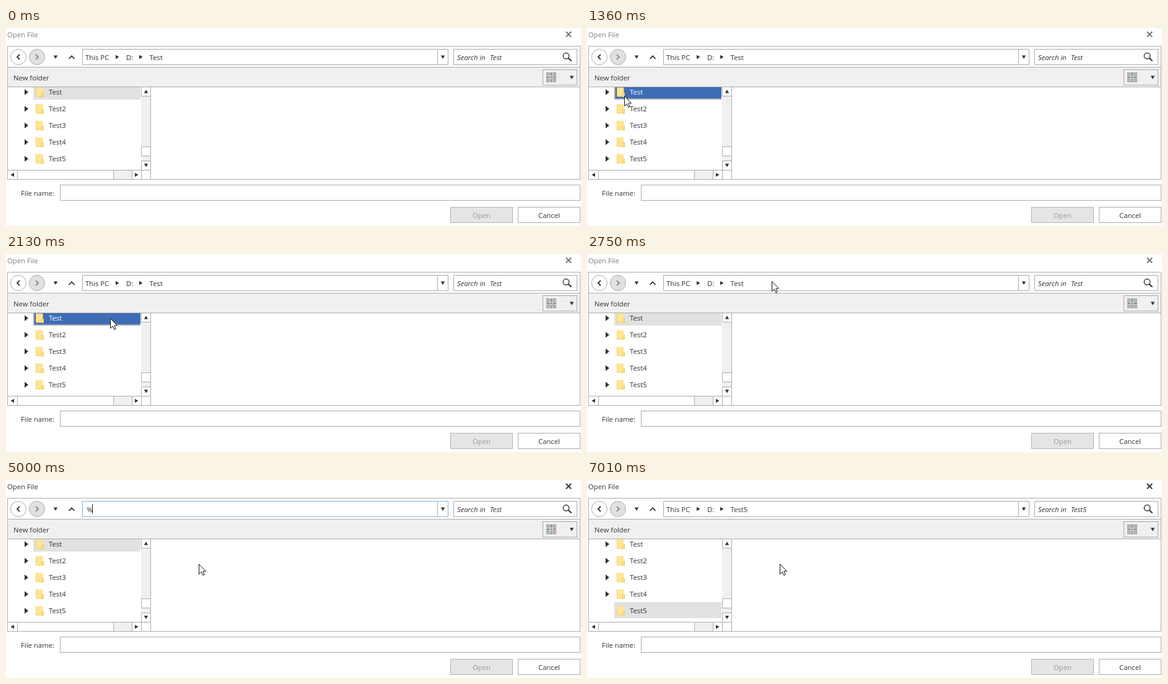
An HTML page that plays this animation: 928x321 px, repeating every 8 s.

```html
<!DOCTYPE html>
<html lang="en">
<head>
<meta charset="utf-8">
<title>Open File</title>
<style>
html, body { margin: 0; width: 100%; height: 100%; overflow: hidden; background: #fff; }
svg { display: block; width: 928px; height: 321px; }
text { font: 11.3px "Open Sans", "Noto Sans", sans-serif; fill: #333; white-space: pre; }
.box { fill: #fff; stroke: #ababab; }
.track { fill: #f0f0f0; }
.glyph { fill: #333; }
.line { fill: none; stroke: #333; stroke-width: 1.8; }
.italic { font-style: italic; }
.mid { text-anchor: middle; }
</style>
</head>
<body>
<svg viewBox="0 0 928 321">
  <defs>
    <path id="down" class="glyph" d="M-3.2-2.5H3.2L0 3Z"/>
    <path id="right" class="glyph" d="M-2.5-3.3L3 0L-2.5 3.3Z"/>
    <g id="folder">
      <path d="M48 0H59.5V14.5H48Z" fill="#ffe594"/>
      <path d="M48.5 0V14.5H58" fill="none" stroke="#f5cf5f"/>
      <path d="M58.5 8.5H60.5V15H57.5V11Z" fill="#ffe594" stroke="#efc64c"/>
    </g>
    <clipPath id="treeClip"><path d="M3 96H218V230H3Z"/></clipPath>
  </defs>

  <text id="title" x="2" y="15">Open File</text>
  <path id="close" class="line" d="M903.8 6L912.2 14.4M912.2 6L903.8 14.4" style="stroke-width:2"/>

  <rect class="box" x="2.5" y="29.5" width="924" height="216"/>
  <rect x="2.5" y="63.5" width="924" height="32" fill="#f0f0f0" stroke="#ababab"/>

  <circle class="box" cx="20" cy="47" r="12.5"/>
  <path class="line" d="M22 43L18 47L22 51"/>
  <circle cx="50" cy="47" r="12.5" fill="#e1e1e1" stroke="#ababab"/>
  <path class="line" d="M48 43L52 47L48 51" style="stroke:#888"/>
  <use href="#down" x="80" y="47"/>
  <path class="line" d="M101.5 50L106 45.3L110.5 50"/>

  <rect id="address" class="box" x="123.5" y="34.5" width="590" height="25"/>
  <path d="M696.5 35V59" stroke="#ababab"/>
  <use href="#down" x="705" y="47"/>
  <g id="crumbs">
    <text x="128" y="52">This PC</text>
    <use href="#right" x="179.5" y="47"/>
    <text x="194" y="52">D:</text>
    <use href="#right" x="217.5" y="47"/>
    <text id="crumb" x="231.5" y="52">Test</text>
  </g>
  <g id="edit">
    <rect id="selection" x="130" y="39" width="36" height="16" fill="#8cc2f2"/>
    <text id="typed" x="130.3" y="52"></text>
    <path id="caret" d="M.5 39V55" stroke="#222"/>
  </g>

  <rect class="box" x="722.5" y="34.5" width="199" height="25"/>
  <text class="italic" x="728" y="52">Search in</text>
  <text id="search" class="italic" x="781" y="52">Test</text>
  <circle class="line" cx="904" cy="45.3" r="4.8" style="stroke-width:1.4"/>
  <path class="line" d="M907.5 48.8L912.5 53.5" style="stroke-width:2.2"/>

  <text x="12" y="85">New folder</text>
  <rect x="866.5" y="67.5" width="55" height="25" fill="#f0f0f0" stroke="#ababab"/>
  <g id="grid"></g>
  <use href="#down" x="913" y="80"/>

  <g id="tree" clip-path="url(#treeClip)"></g>
  <path class="track" d="M218 96H233V230H218ZM3 231H218V245H3Z"/>
  <path class="box" d="M218.5 95.5H233.5V110.5H218.5ZM218.5 192.5H233.5V207.5H218.5ZM218.5 215.5H233.5V230.5H218.5ZM218.5 230.5H233.5V245.5H218.5Z"/>
  <path class="box" d="M2.5 230.5H18.5V245.5H2.5ZM18.5 230.5H173.5V245.5H18.5ZM203.5 230.5H218.5V245.5H203.5Z"/>
  <path d="M2.5 230.5H218M2.5 245.5H234M233.5 95V246" stroke="#ababab"/>
  <use href="#down" transform="translate(226 103) scale(1 -1)"/>
  <use href="#down" x="226" y="222.5"/>
  <use href="#right" transform="translate(10.5 238) scale(-1 1)"/>
  <use href="#right" x="210.5" y="238"/>

  <text x="24" y="272">File name:</text>
  <rect class="box" x="87.5" y="254.5" width="839" height="25"/>
  <rect x="717.5" y="290.5" width="100" height="25" fill="#e5e5e5" stroke="#b4b4b4"/>
  <text class="mid" x="767.5" y="308" style="fill:#999">Open</text>
  <rect class="box" x="826.5" y="290.5" width="100" height="25"/>
  <text class="mid" x="876.5" y="308">Cancel</text>

  <path id="arrow" d="M.5.5V16.5L4.3 13L6.8 18.5L9.2 17.5L6.9 12H11.5Z" fill="#fff" stroke="#111"/>
  <path id="beam" d="M297 37.5H299.5M301.5 37.5H304M300.5 38V52M297 52.5H299.5M301.5 52.5H304" fill="none" stroke="#111"/>
</svg>
<script>
const LOOP = 8000;
const EDIT_START = 3360, EDIT_END = 6860;

// time, x, y of the pointer tip
const POINTER = [
  [120, 756, 281], [200, 680, 236], [280, 560, 170], [350, 430, 102], [430, 340, 58], [510, 302, 42],
  [830, 296, 42], [910, 262, 46], [980, 205, 62], [1060, 140, 84], [1140, 80, 98], [1210, 58, 101],
  [1290, 60, 110], [1370, 75, 133], [1450, 100, 160], [1530, 125, 180], [1610, 145, 188],
  [1670, 159, 158], [1750, 163, 140], [1830, 165, 126], [1900, 166, 116], [1980, 167, 109],
  [2060, 168, 105], [2130, 168, 104], [2210, 188, 92], [2290, 225, 75], [2360, 258, 60], [2440, 279, 53],
  [2590, 285, 50], [2670, 293, 46], [2750, 298, 44], [3590, 309, 112], [3670, 311, 136]
];

// time, text, caret index (0 = all selected)
const TYPING = [
  [EDIT_START, "D:\\Test", 0], [5000, "%", 1], [5150, "%%", 2], [5700, "%%", 1],
  [5850, "%t%", 2], [5930, "%te%", 3], [6230, "%tes%", 4], [6310, "%test%", 5]
];

const $ = id => document.getElementById(id);
const show = (el, on) => { el.style.display = on ? "" : "none"; };
const setText = (el, s) => { if (el.textContent !== s) el.textContent = s; };
const stepAt = (table, t) => table.findLast(step => step[0] <= t);

function add(parent, tag, attrs, text = "") {
  const el = document.createElementNS("http://www.w3.org/2000/svg", tag);
  for (const key in attrs) el.setAttribute(key, attrs[key]);
  el.textContent = text;
  return parent.appendChild(el);
}

const dots = ["#c55", "#555", "#48a", "#555", "#2ab", "#555", "#48a", "#584", "#c55"];
dots.forEach((color, i) => {
  const x = 872.5 + i % 3 * 5.5, y = 72.5 + Math.floor(i / 3) * 5.5;
  add($("grid"), "rect", { x, y, width: 4, height: 4, fill: "#fff", stroke: "#888", "stroke-width": .8 });
  add($("grid"), "rect", { x: x + 1, y: y + 1, width: 2, height: 2, fill: color });
});

const rows = ["Test", "Test2", "Test3", "Test4", "Test5"].map((name, i) => {
  const top = 90 + 27 * i, tree = $("tree");
  const back = add(tree, "rect", { x: 44, y: top, width: 173, height: 26 });
  const frame = add(tree, "path", { d: `M45 ${top}v25h172`, fill: "none", stroke: "#a3a9b5", "stroke-width": 2 });
  const arrow = add(tree, "path", { d: `M30 ${top + 9.2}l6 4.8l-6 4.8z`, class: "glyph" });
  add(tree, "use", { href: "#folder", y: top + 6.5 });
  const label = add(tree, "text", { x: 69, y: top + 18 }, name);
  return { top, back, frame, arrow, label };
});

function drawTree(t, tip) {
  const selected = t < 6940 ? 0 : 4;
  rows.forEach((row, i) => {
    const hover = tip && tip[1] >= 44 && tip[1] < 217 &&
      tip[2] >= Math.max(row.top, 96) && tip[2] < row.top + 27;
    row.back.style.fill = hover ? "#3e6db5" : i === selected ? "#e1e1e1" : "none";
    row.label.style.fill = hover ? "#fff" : "";
    show(row.frame, hover && i === selected);
  });
  show(rows[4].arrow, t < 7010);
}

function drawAddress(t) {
  const editing = t >= EDIT_START && t < EDIT_END;
  const folder = t < EDIT_END ? "Test" : "Test5";
  setText($("crumb"), folder);
  setText($("search"), folder);
  show($("crumbs"), !editing);
  show($("edit"), editing);
  $("address").style.stroke = editing ? "#7ab8ea" : "";
  if (!editing) return;
  const [, text, index] = stepAt(TYPING, t);
  setText($("typed"), text);
  show($("selection"), !index);
  show($("caret"), index);
  if (index) {
    const x = 130 + Math.round($("typed").getSubStringLength(0, index));
    $("caret").setAttribute("transform", `translate(${x})`);
  }
}

function draw(t) {
  const tip = stepAt(POINTER, t);
  const beam = t >= EDIT_START && t < 3590;
  show($("beam"), beam);
  show($("arrow"), tip && !beam);
  if (tip) $("arrow").setAttribute("transform", `translate(${tip[1]} ${tip[2]})`);
  const active = t >= EDIT_START;
  $("title").style.fill = active ? "#333" : "#808080";
  $("close").style.stroke = active ? "#333" : "#777";
  drawTree(t, tip);
  drawAddress(t);
}

const start = performance.now();
function tick() {
  draw((performance.now() - start) % LOOP);
  requestAnimationFrame(tick);
}
tick();
</script>
</body>
</html>
```
